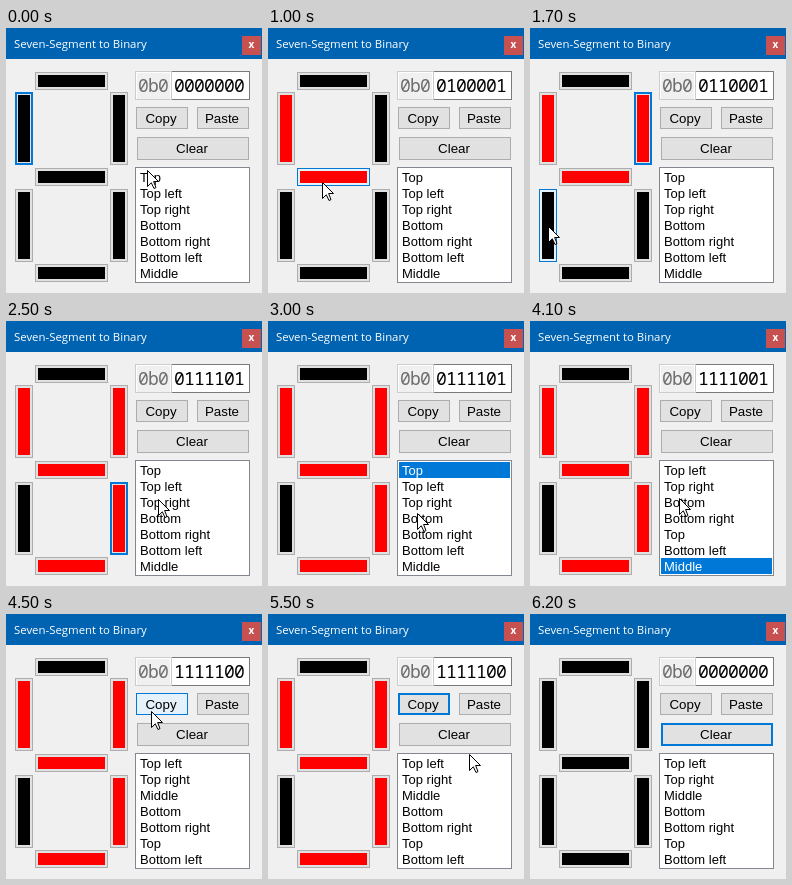
An HTML page that plays this animation: 256x265 px, repeating every 6300 ms.

```html
<!DOCTYPE html>
<html lang="en">
<head>
<meta charset="utf-8">
<title>Seven-Segment to Binary</title>
<style>
  html, body { margin: 0; width: 100%; height: 100%; overflow: hidden; background: #f0f0f0; }
  svg { display: block; width: 256px; height: 265px; }
  rect { shape-rendering: crispEdges; }
  text { white-space: pre; }
  .title { font: 11.4px "Open Sans", "Noto Sans", sans-serif; fill: #fff; }
  .close { font-weight: 700; font-size: 10px; text-anchor: middle; }
  .mono { font: 18px "Noto Sans Mono", monospace; letter-spacing: -0.8px; }
  .label { font: 13.33px "Liberation Sans", sans-serif; text-anchor: middle; }
  .item { font: 13px "Liberation Sans", sans-serif; }
  .face { fill: #e1e1e1; stroke: #adadad; }
  .ring { fill: none; }
  .lamp { fill: #000; }
  .lit .lamp { fill: #f00; }
  .focus .face, .focus .ring, .hover .face { stroke: #0078d7; }
  .hover .face { fill: #e5f1fb; }
  .hover .ring { stroke: none; }
</style>
</head>
<body>
<svg viewBox="0 0 256 265" xmlns="http://www.w3.org/2000/svg">
  <rect width="256" height="265" fill="#f0f0f0"/>
  <rect width="256" height="31" fill="#0063b1"/>
  <text class="title" x="8" y="20">Seven-Segment to Binary</text>
  <rect x="236" y="8" width="19" height="19" fill="#c75050"/>
  <text class="title close" x="245.5" y="20">x</text>

  <rect x="165.5" y="43.5" width="78" height="28" fill="#fff" stroke="#7a7a7a"/>
  <rect x="129.5" y="43.5" width="36" height="28" fill="#fff" stroke="#ccc"/>
  <rect x="131" y="45" width="33" height="26" fill="#f0f0f0"/>
  <text class="mono" x="132" y="64" fill="#6d6d6d">0b0</text>
  <text class="mono" id="bits" x="168" y="64"></text>

  <g id="buttons"></g>

  <rect x="129.5" y="139.5" width="114" height="115" fill="#fff" stroke="#828790"/>
  <rect id="selection" x="131" width="111" height="16" fill="#0078d7"/>
  <g id="list"></g>

  <path id="cursor" d="M.5.5V16.5L4.3 12.8 7 18.5 9 17.6 6.6 11.5H11.5Z" fill="#fff" stroke="#000"/>
</svg>
<script>
const LOOP = 6300, STEP = 100, HOLD = 100, ROW = 16;
const $ = id => document.getElementById(id);

function add(parent, tag, attrs, text = '') {
  const el = document.createElementNS('http://www.w3.org/2000/svg', tag);
  for (const key in attrs) el.setAttribute(key, attrs[key]);
  el.textContent = text;
  parent.append(el);
  return el;
}

const box = (x, y, w, h) => ({ x, y, w, h });
const bar = level => box(29, 44 + 96 * level, 73, 18);
const post = (column, level) => box(9 + 95 * column, 64 + 97 * level, 18, 73);

const segments = {
  'Top': bar(0),
  'Top left': post(0, 0),
  'Top right': post(1, 0),
  'Bottom': bar(2),
  'Bottom right': post(1, 1),
  'Bottom left': post(0, 1),
  'Middle': bar(1)
};
const commands = {
  Copy: box(130, 79, 52, 22),
  Paste: box(191, 79, 52, 22),
  Clear: box(131, 109, 112, 23)
};
const controls = { ...segments, ...commands };
const names = Object.keys(segments);

function inset(parent, cls, { x, y, w, h }, d) {
  add(parent, 'rect', { class: cls, x: x + d, y: y + d, width: w - 2 * d, height: h - 2 * d });
}

const buttons = Object.entries(controls).map(([name, area]) => {
  const el = add($('buttons'), 'g', {});
  const { x, y, w, h } = area;
  inset(el, 'face', area, 0.5);
  inset(el, 'ring', area, 1.5);
  if (name in segments) inset(el, 'lamp', area, 3);
  else add(el, 'text', { class: 'label', x: x + w / 2 - 1, y: y + Math.floor(h / 2) + 5 }, name);
  return { name, area, el };
});
const rows = names.map((_, i) => add($('list'), 'text', { class: 'item', x: 134, y: 154 + ROW * i }));

// A visit: the pointer arrives HOLD ms early, waits, then acts at the given time.
const visit = (time, point, act = () => {}) => ({ time, point, act });
const centre = ({ x, y, w, h }) => [x + w / 2, y + h / 2];
const press = (time, name, point = centre(controls[name])) => visit(time, point, s => {
  s.focus = name;
  if (name in segments) s.lit.add(name);
  if (name === 'Clear') s.lit.clear();
});
const rowPoint = row => [149, 145 + ROW * row];
const grab = (time, row) => visit(time, rowPoint(row), s => {
  s.selected = row;
  s.focus = 'list';
});
const drop = (time, row) => visit(time, rowPoint(row), s => {
  s.order.splice(row, 0, ...s.order.splice(s.selected, 1));
  s.selected = -1;
});

const visits = [
  visit(0, [141, 142]),
  press(400, 'Top left'),
  press(1000, 'Middle', [54, 154]),
  press(1400, 'Top right'),
  visit(1700, centre(segments['Bottom left'])),
  press(2000, 'Bottom'),
  press(2300, 'Bottom right'),
  visit(2600, [152, 178]),
  grab(2800, 0),
  drop(3200, 4),
  grab(3700, 6),
  drop(4200, 2),
  press(4600, 'Copy', [145, 97]),
  visit(5000, [268, 300]),
  visit(5400, [268, 300]),
  visit(5600, [201, 140]),
  press(5800, 'Clear'),
  visit(LOOP, [243, 282])
];

const smooth = k => k * k * (3 - 2 * k);

function pointerAt(t) {
  const i = visits.findIndex(v => v.time > t);
  const from = visits[i - 1], to = visits[i];
  const k = smooth(Math.min(1, (t - from.time) / (to.time - HOLD - from.time)));
  return from.point.map((p, axis) => Math.round(p + (to.point[axis] - p) * k));
}

function stateAt(t) {
  const state = { lit: new Set(), order: [...names], focus: 'Top left', selected: -1 };
  for (const { time, act } of visits) if (time <= t) act(state);
  return state;
}

function draw(t) {
  const { lit, order, focus, selected } = stateAt(t);
  const [px, py] = pointerAt(t);
  for (const { name, area: { x, y, w, h }, el } of buttons) {
    el.classList.toggle('lit', lit.has(name));
    el.classList.toggle('focus', focus === name);
    el.classList.toggle('hover', px >= x && px < x + w && py >= y && py < y + h);
  }
  $('bits').textContent = order.map(name => +lit.has(name)).join('');
  rows.forEach((row, i) => {
    row.textContent = order[i];
    row.setAttribute('fill', i === selected ? '#fff' : '#000');
  });
  $('selection').setAttribute('y', 141 + ROW * selected);
  $('selection').setAttribute('visibility', selected < 0 ? 'hidden' : 'visible');
  $('cursor').setAttribute('transform', `translate(${px} ${py})`);
}

const start = performance.now();
function tick() {
  const t = (performance.now() - start) % LOOP;
  draw(Math.floor(t / STEP) * STEP);
  requestAnimationFrame(tick);
}
tick();
</script>
</body>
</html>
```
